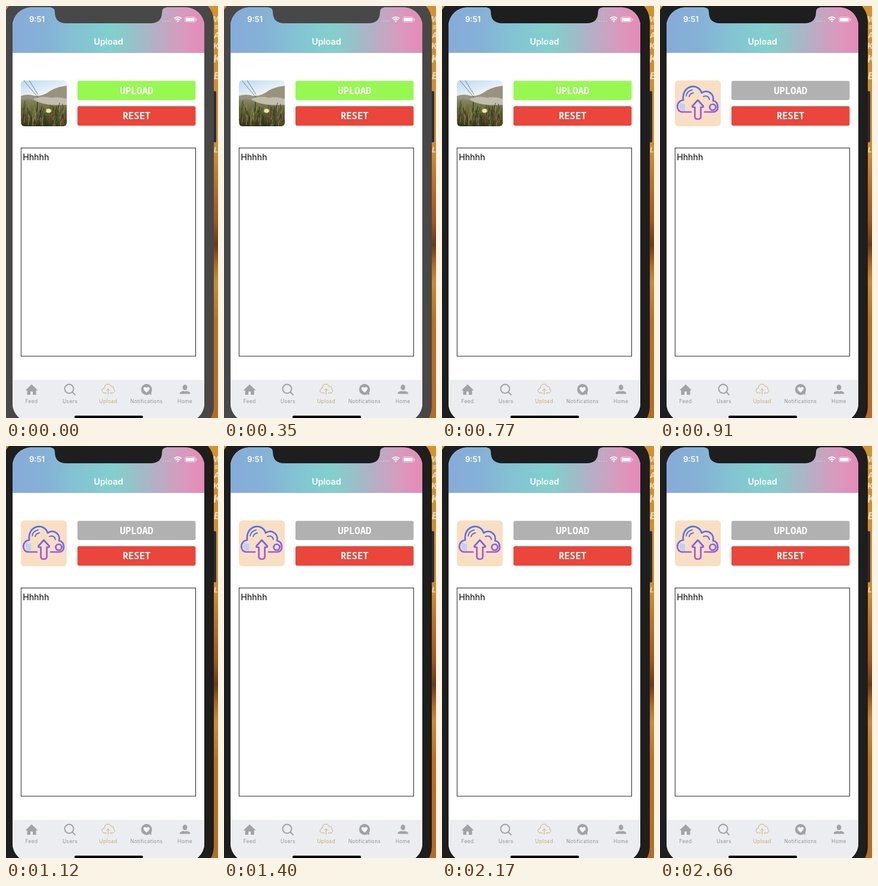
Animation of 356 by 692 pixels, one loop 2730 ms. Source, as an HTML page:

```html
<!DOCTYPE html>
<html lang="en">
<head>
<meta charset="utf-8">
<title>Upload screen</title>
<style>
  html, body { margin: 0; width: 100%; height: 100%; overflow: hidden; background: #fff; }
  svg { display: block; width: 356px; height: 692px; font-family: Inter, sans-serif; }
  .bezel { fill: #484848; animation: focus 2730ms step-end infinite; }
  .before { animation: leave 2730ms step-end infinite; }
  .after { opacity: 0; animation: arrive 2730ms step-end infinite; }
  .button { fill: #96f951; animation: disable 2730ms step-end infinite; }
  .action { font: 700 15.6px "Noto Sans Mono", monospace; fill: #fff; text-anchor: middle; }
  .tabs { fill: #a2a2a5; }
  .tabs text { font-size: 8.3px; font-weight: 400; letter-spacing: .4px; text-anchor: middle; fill: #909094; }
  .tabs .active { fill: #c0aa70; }
  .poster text { font: italic 800 13px Inter, sans-serif; fill: #ecd5a4; }
  @keyframes focus { 0% { fill: #484848; } 28.2%, 100% { fill: #1e1e1e; } }
  @keyframes leave { 0% { opacity: 1; } 33.3%, 100% { opacity: 0; } }
  @keyframes arrive { 0% { opacity: 0; } 33.3%, 100% { opacity: 1; } }
  @keyframes disable { 0% { fill: #96f951; } 33.3%, 100% { fill: #b1b1b1; } }
</style>
</head>
<body>
<svg viewBox="0 0 356 692">
  <defs>
    <linearGradient id="header">
      <stop offset="0" stop-color="#86acd9"/>
      <stop offset=".16" stop-color="#85b0d7"/>
      <stop offset=".33" stop-color="#83c2d3"/>
      <stop offset=".52" stop-color="#82d0ce"/>
      <stop offset=".62" stop-color="#92c4c8"/>
      <stop offset=".74" stop-color="#b2b0c5"/>
      <stop offset=".88" stop-color="#d79bbe"/>
      <stop offset="1" stop-color="#e78ab7"/>
    </linearGradient>
    <linearGradient id="wall" x2="0" y2="1">
      <stop offset="0" stop-color="#d5912b"/>
      <stop offset=".36" stop-color="#d08b30"/>
      <stop offset=".43" stop-color="#bd7026"/>
      <stop offset=".52" stop-color="#a4571a"/>
      <stop offset=".58" stop-color="#703812"/>
      <stop offset=".63" stop-color="#b56c20"/>
      <stop offset=".67" stop-color="#cd8a35"/>
      <stop offset=".76" stop-color="#bd701f"/>
      <stop offset="1" stop-color="#b96c20"/>
    </linearGradient>
    <linearGradient id="sky" x2=".3" y2="1">
      <stop offset="0" stop-color="#b9d9f2"/>
      <stop offset=".4" stop-color="#eef3f6"/>
    </linearGradient>
    <linearGradient id="ground" x2="0" y2="1">
      <stop offset="0" stop-color="#8b8866"/>
      <stop offset=".4" stop-color="#66683c"/>
      <stop offset="1" stop-color="#2f3319"/>
    </linearGradient>
    <linearGradient id="ink" gradientUnits="userSpaceOnUse" x1="0" y1="134" x2="0" y2="191">
      <stop offset="0" stop-color="#4a72ee"/>
      <stop offset=".5" stop-color="#7562ec"/>
      <stop offset="1" stop-color="#bd4ee0"/>
    </linearGradient>
    <clipPath id="screen"><rect x="11" y="2.6" width="322" height="696" rx="31"/></clipPath>
    <clipPath id="thumb"><rect x="25" y="125" width="77" height="77" rx="6"/></clipPath>
  </defs>

  <g class="poster">
    <rect width="356" height="692" fill="url(#wall)"/>
    <text x="346" y="27">M</text>
    <text x="350" y="39" style="font-size:9px">S</text>
    <text x="349" y="54">A</text>
    <text x="348" y="72">K</text>
    <text x="348" y="95" style="font-size:18px">K</text>
    <text x="349" y="123" style="font-size:16px">E</text>
    <text x="349" y="246" style="font-size:12px">L</text>
  </g>
  <rect x="344" y="143" width="9" height="86" rx="2" fill="#2b2c31"/>
  <rect class="bezel" x="-5" y="-13" width="354" height="725" rx="39"/>

  <g clip-path="url(#screen)">
    <rect x="11" y="2" width="322" height="690" fill="#fff"/>
    <rect x="11" y="2" width="322" height="76" fill="url(#header)"/>
    <rect x="11" y="78" width="322" height="1" fill="#b7b9bd"/>
    <rect x="11" y="628" width="322" height="64" fill="#ecedf1"/>
  </g>
  <path class="bezel" d="M75 0V2.600Q82 3.500 82 10Q82 29 101 29H243Q262 29 262 10Q262 3.500 269 2.600V0Z"/>

  <g fill="#fff">
    <text x="39" y="27" font-size="13" font-weight="600">9:51</text>
    <text x="172" y="65" font-size="14.3" font-weight="600" text-anchor="middle">Upload</text>
    <path d="M263 25.500H278" stroke="#fff" stroke-width="1.500" stroke-dasharray="2 2" opacity=".35"/>
    <path d="M282.500 21Q288.500 15.800 294.500 21M284.700 23.400Q288.500 20 292.300 23.400" fill="none" stroke="#fff" stroke-width="1.800"/>
    <path d="M286.500 25Q288.500 23.300 290.500 25L288.500 27.200Z"/>
    <rect x="300.500" y="18.500" width="17.500" height="8.500" rx="2.500" fill="none" stroke="#fff" stroke-opacity=".6"/>
    <rect x="302" y="20" width="14.500" height="5.500" rx="1.300"/>
    <rect x="319" y="21" width="1.300" height="3.500" rx=".6" opacity=".7"/>
  </g>

  <g clip-path="url(#thumb)">
    <g class="before">
      <rect x="25" y="125" width="77" height="77" fill="url(#sky)"/>
      <path d="M25 151Q37 147 49 151Q62 152 75 142Q88 135 102 134V202H25Z" fill="#97937f"/>
      <path d="M46 156Q60 150 76 154Q90 152 102 156V172H60Z" fill="#c3bdad"/>
      <path d="M25 157Q42 154 56 162Q74 168 102 166V202H25Z" fill="url(#ground)"/>
      <path d="M30 125L54 154M39 125L54 149" fill="none" stroke="#47515a" stroke-width=".7"/>
      <g id="grass" fill="none" stroke-linecap="round"></g>
      <ellipse cx="71.500" cy="176" rx="4.200" ry="3.500" fill="#f1e2ac"/>
    </g>
    <g class="after">
      <rect x="25" y="125" width="77" height="77" fill="#f8dfc2"/>
      <path d="M33 163Q31 170 36 175L42 177V164Z" fill="#bdd2f5"/>
      <g fill="none" stroke="url(#ink)" stroke-width="2.700" stroke-linecap="round" stroke-linejoin="round">
        <path d="M52 178H38C26 178 26 159 39 158C36 133 64 128 70 146C81 139 92 149 89 159C94 160 97 164 97 170C97 175 94 178 89 178H75"/>
        <path d="M44 151Q45 143 54 141M49 152Q50 147 56 146M73 152Q81 149 83 157" stroke-width="2"/>
        <circle cx="88.500" cy="170" r="5"/>
        <path d="M63.500 158L54.500 168Q53.500 170 56 170H58.500V186Q58.500 190 63.500 190Q68.500 190 68.500 186V170H71Q73.500 170 72.500 168Z" fill="#f8dfc2"/>
      </g>
    </g>
  </g>

  <rect class="button" x="120" y="125.800" width="198.400" height="32.100" rx="3"/>
  <rect x="120" y="168.300" width="198.400" height="32.700" rx="3" fill="#ea463b"/>
  <text class="action" x="219.300" y="147.500">UPLOAD</text>
  <text class="action" x="219.300" y="190.300">RESET</text>

  <rect x="25.300" y="238.450" width="293.200" height="349.700" fill="#fff" stroke="#000" stroke-width=".86"/>
  <text x="28.200" y="259" font-size="14.200" fill="#000">Hhhhh</text>

  <g class="tabs">
    <path d="M43 635.500L32.500 645.500H35.500V653H41V647.500H45V653H50.500V645.500H53.500Z"/>
    <g fill="none" stroke="#a2a2a5" stroke-width="2" stroke-linecap="round">
      <circle cx="106" cy="643" r="7.500"/>
      <path d="M111.500 648.500L116 653"/>
    </g>
    <path d="M168.500 650H166C160 650 159.500 643 165 642C165 634 175 633 176.500 639C181 638.500 182 642 180.500 643.500C184 645 182.500 650 179 650H174.500M171.500 652.500V643M168.500 646L171.500 643L174.500 646" fill="none" stroke="#c0aa70" stroke-width=".9" stroke-linecap="round" stroke-linejoin="round"/>
    <circle cx="236" cy="644" r="9.200"/>
    <path d="M238 650L244 653.500L244 647Z"/>
    <path d="M236 649.500L231.700 645C228.800 641.500 233.500 638 236 641.700C238.500 638 243.200 641.500 240.300 645Z" fill="#f4f4f6"/>
    <ellipse cx="300.500" cy="640.600" rx="3.800" ry="4.700"/>
    <path d="M291.500 651.500Q291 648 297.500 646.500L300.500 647.500L303.500 646.500Q310 648 309.500 651.500Z"/>
    <text x="43" y="667">Feed</text>
    <text x="107.500" y="667">Users</text>
    <text class="active" x="171.700" y="667">Upload</text>
    <text x="236" y="667">Notifications</text>
    <text x="300.500" y="667">Home</text>
  </g>
  <rect x="115" y="688" width="115" height="4.500" rx="2.200" fill="#000"/>
</svg>
<script>
  // Seeded blades of grass for the thumbnail
  let seed = 7;
  const rand = () => (seed = seed * 16807 % 2147483647) / 2147483647;
  const colors = ['#39451c', '#71703b', '#8f8d58', '#26291a', '#79452f'];
  let blades = '';
  for (let i = 0; i < 130; i++) {
    const x = 25 + rand() * 77, y = 175 + rand() * 29;
    const lean = rand() * 6 - 2, height = 6 + rand() * 11;
    const color = colors[Math.floor(rand() * colors.length)];
    blades += `<path d="M${x} ${y}q0 ${-height / 2} ${lean} ${-height}" stroke="${color}"/>`;
  }
  document.getElementById('grass').innerHTML = blades;
</script>
</body>
</html>
```
